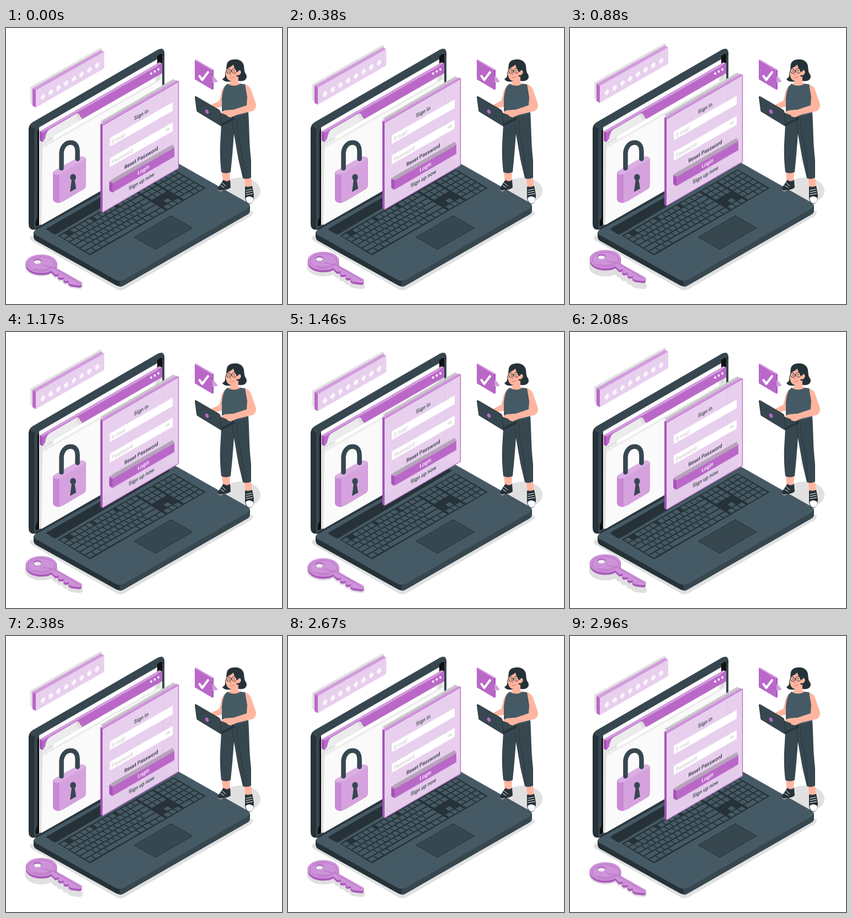
Write an HTML page that moves like this. It is 500x500 px and loops after 3 s.

```html
<!DOCTYPE html>
<html lang="en">
<head>
<meta charset="utf-8">
<title>Sign in</title>
<style>
  html, body { margin: 0; width: 100%; height: 100%; overflow: hidden; background: #fff; }
  svg { display: block; width: 100vw; height: 100vh; }
  text { font: 500 9.8px Roboto, Inter, sans-serif; }
  .panel { animation: lift 3s linear infinite; }
  .float { animation: hover 1.5s linear infinite; }
  @keyframes lift { 50% { transform: translateY(-20px); } }
  @keyframes hover { 50% { transform: translateY(-10px); } }
  .ink { fill: #263238; }
  .slate { fill: #37474f; }
  .steel { fill: #455a64; }
  .shade { fill: #e0e0e0; }
  .deep { fill: #a653b8; }
  .violet { fill: #ba68c8; }
  .lilac { fill: #d29bdc; }
  .pale { fill: #e8cfee; }
  .white { fill: #fff; }
  .skin { fill: #ffb5a0; }
  .line { fill: none; stroke-linecap: round; stroke-linejoin: round; }
</style>
</head>
<body>
<svg viewBox="0 0 500 500">
  <defs>
    <path id="keyShape" d="M36 427C36 418 48 411 64 411C80 411 92 418 92 427C92 430 91 432 89 434L137 461V465L134 467L118 465L113 462L114 458L107 459L104 456L105 452L97 453L94 450L96 446L89 447L82 440C77 443 71 444 64 444C48 444 36 437 36 427Z"/>
  </defs>

  <!-- ground shadows -->
  <path class="shade" d="M46 376Q40 381 47 386L198 472Q206 478 215 473L443 341Q450 336 445 331L206 440Z"/>
  <ellipse class="shade" cx="425" cy="295" rx="36" ry="24"/>
  <use href="#keyShape" y="4" fill="#e0e0e0" stroke="#e0e0e0" stroke-width="4" stroke-linejoin="round"/>

  <!-- laptop base -->
  <path class="ink" d="M50 370V379Q51 384 55 386L199 466Q206 470 214 466L437 338Q442 335 442 330V321Z"/>
  <path class="slate" d="M206 456V469Q210 469 214 466L437 338Q442 335 442 330V321Z"/>
  <path class="steel" d="M56 364Q46 370 54 375L198 456Q206 460 214 456L436 328Q446 322 437 316L292 234Q287 231 282 234Z"/>

  <!-- lid -->
  <path class="ink" d="M41 184Q41 175 48 171L275 39.500Q287 33 287 47V236L56 365Q41 368 41 355Z"/>
  <path class="slate" d="M51 190Q51 181 58 177L278 50Q287 45 287 55V232L51 365Z"/>
  <path class="slate" d="M48 171L275 39.500Q285 34.500 287 45L279 50L57 178L51 183Q44 178 44 175Z"/>
  <path fill="#111" d="M57 186L274 57L274 51L280 47Q283 46 283 50V229L56 359Q53 359 54 350L57 343Z"/>
  <path fill="#fafafa" d="M60 180L274 56.500V234L60 357Z"/>
  <path class="ink" d="M74 363L282 243L298 251L92 373Q88 375 84 372L76 367Q72 365 74 363Z"/>

  <!-- browser window -->
  <path class="shade" d="M61 204L66 207V355L61 357Z"/>
  <path fill="#fafafa" d="M66 207L283 82V231L64 357Z"/>
  <path class="lilac" d="M61 187L278 62L283 64L66 189Z"/>
  <path class="deep" d="M61 187L66 189V207L61 204Z"/>
  <path class="violet" d="M66 189L283 64V82L66 207Z"/>
  <path fill="#ececec" d="M66 207L71 200Q73 188 78 184L126 156Q132 153 134 160L138 165L283 82V93L66 218Z"/>
  <path class="shade" d="M126 156Q132 153 134 160L138 165L133 168Q129 166 128 162Z"/>
  <path class="shade" d="M61 204L66 207V218L61 215Z"/>
  <path class="white" d="M86 196L269 90.500V97L86 202.500Z"/>
  <g class="white">
    <ellipse cx="263" cy="82.500" rx="1.900" ry="2.300"/>
    <ellipse cx="269.500" cy="78.700" rx="1.900" ry="2.300"/>
    <ellipse cx="276" cy="75" rx="1.900" ry="2.300"/>
  </g>
  <path class="line" stroke="#bdbdbd" d="M272.500 89L279 85.200M272.500 92L279 88.200M272.500 95L279 91.200M69 208L72 206M75 204L78 202M80 201.500L83 200"/>

  <!-- padlock -->
  <path fill="#d5a2de" d="M85 264Q85 261 89 259L131 235Q135 232 140 233Q145 234 145 239V284Q145 289 141 292L104 314Q97 318 91 316Q85 314 85 309Z"/>
  <path fill="#c98ad5" d="M85 263Q90 268 97 265V317Q85 317 85 309Z"/>
  <path fill="#dcaee4" d="M85 262Q85 260 89 258L131 234Q136 231 141 234Q145 236 141 239L102 262Q95 266 88 264Z"/>
  <path class="line" stroke="#37474f" stroke-width="8.500" d="M100.500 254V228C100.500 216 108 207.500 117 207.500C125 207.500 129.500 213 129.500 224V237"/>
  <ellipse class="slate" cx="121.500" cy="270.500" rx="5.200" ry="6"/>
  <path class="slate" d="M119 274L124 272L127 291L116 297Z"/>

  <!-- keyboard and touchpad -->
  <path class="ink" d="M94 376L304 256L362 290L152 412Z"/>
  <g id="keys" class="steel" transform="matrix(9.240 -5.310 9.300 5.600 96 376.500)"/>
  <path class="slate" stroke="#263238" d="M232 379L299 340L338 362L271 401Z"/>

  <!-- sign-in panel -->
  <g class="panel">
    <path fill="#c8c8c8" d="M171 169L303 92.500L307 95L176 172Z"/>
    <path class="lilac" d="M171 173.500L308 94.500L313 96.500L175 176.500Z"/>
    <path class="deep" d="M171 173.500L175 176.500V334L171 332Z"/>
    <path class="pale" opacity=".985" d="M175 176.500L313 96.500V254L175 334Z"/>
    <path class="line" stroke="#ba68c8" stroke-width="1.300" d="M172 174L175 176.500L312.500 97V254L175 334"/>
    <path class="white" d="M188 199.500L302 134.500V150L188 215ZM188 236L302 171V187L188 252Z"/>
    <g class="line" stroke="#cfcfcf" stroke-width=".8">
      <path d="M290.500 186Q292 180.500 296.500 181.500Q295 187 290.500 186Z"/>
      <circle cx="293.500" cy="183.700" r="1.300"/>
    </g>
    <path fill="#b5a4b9" d="M187 278L193 273.500L302 211L305 216.500L193 281Z"/>
    <path class="deep" d="M187 278L193 281V298L189 296Q187 295 187 292Z"/>
    <path class="violet" d="M193 281L305 216.500V233L193 298Z"/>
    <g id="labels"/>
  </g>

  <!-- password bar -->
  <g class="float">
    <path class="shade" d="M44 107L171 36L174 38V68L50 139L44 136Z"/>
    <path class="lilac" d="M48 109.500L172 40L178 43.500L54 113.500Z"/>
    <path class="violet" d="M48 109.500L54 113V144L48 140.500Z"/>
    <path class="pale" d="M54 113L178 43V73L54 144Z"/>
    <g id="stars" class="line" stroke="#fff" stroke-width="1.900"/>
  </g>

  <!-- key -->
  <g class="float">
    <use href="#keyShape" y="3.500" class="deep"/>
    <use href="#keyShape" y="1.700" class="deep"/>
    <use href="#keyShape" fill="#cd93d8" stroke="#b868c6" stroke-width=".8"/>
    <ellipse class="line" cx="64" cy="427.500" rx="24" ry="13" stroke="#b868c6"/>
    <path class="line" stroke="#b868c6" d="M66 430L85 434L133 462M52 436Q68 442 82 433"/>
    <ellipse class="deep" cx="57" cy="422.700" rx="7.500" ry="4.500"/>
    <ellipse fill="#f2f2f2" cx="57" cy="423.800" rx="6.600" ry="3.300"/>
  </g>

  <!-- speech bubble -->
  <path class="lilac" d="M342 58L344 57L376 75.500L374 77Z"/>
  <path class="deep" d="M374 77L376 75.500V110.500L374 112Z"/>
  <path class="lilac" d="M376 87L384 97.500L373 99V88Z"/>
  <path class="violet" d="M342 58L374 77V112L342 93Z"/>
  <path class="line" stroke="#fff" stroke-width="4" d="M350.500 87L355.500 94L366 80"/>

  <!-- woman: legs and shoes -->
  <path class="skin" d="M391 259H406L405 279L393 280ZM431 268H444L445 289H434Z"/>
  <path class="ink" d="M394 275Q400 280 406 275L407 289Q402 293 396 293L386 296Q381 294 385 288Z"/>
  <path class="ink" d="M433 287Q440 289 446 286L449 302Q449 317 441 319Q434 318 433 308Z"/>
  <path class="white" d="M434 308Q440 302 448 308Q448 317 441 318Q435 317 434 308Z"/>
  <path class="line" stroke="#fff" stroke-width="1" d="M389 285L395 289M392 281L398 286M435 294L445 292M435 298L446 296M435 302L447 300M384 293Q386 297 392 294"/>
  <path class="slate" d="M391 157L439 152C441 180 440 205 444 240L444 271Q436 275 429 272L421 238L413 192L410 230L407 261Q398 265 390 261Q387 235 388 211Z"/>
  <path class="line" stroke="#263238" stroke-width=".9" d="M413 192L410 168M418 165Q418 190 424 209Q430 240 431 270M394 165Q399 170 409 164"/>

  <!-- woman: head, torso and arms -->
  <path class="ink" d="M400 72C398 62 405 57 413 57C422 56 430 61 431 69C432 75 431 79 435 84C438 90 434 96 427 96C421 97 417 94 415 91L408 97C401 98 394 97 392 92C396 91 398 87 397 81Z"/>
  <path class="skin" d="M397 105Q390 110 389 123L386 132L372 139L377 146L393 142L400 125Z"/>
  <path class="skin" d="M407 88H421V99L429 102Q417 111 400 102L407 99Z"/>
  <path class="skin" d="M399 74C402 69 408 68 412 66C415 72 419 75 422 76C426 76 427 81 424 84C422 86 420 86 418 85C417 93 412 97 407 96C401 95 398 88 398 80Z"/>
  <path class="ink" d="M399 75C399 66 404 62 412 62L418 64L422 77L419 80C416 76 413 72 412 66C409 70 404 71 399 75Z"/>
  <g class="line" stroke="#263238" stroke-width="1">
    <circle cx="403.500" cy="78" r="4"/>
    <circle cx="413.500" cy="77.500" r="4.400"/>
    <path d="M407.500 78L409 77.500M418 77L423 76"/>
    <path stroke="#d4705f" d="M408 80L406 84.500L408 85M405.500 89Q409 92 413 88"/>
  </g>
  <circle class="ink" cx="404" cy="78" r="1"/>
  <circle class="ink" cx="413" cy="77.500" r="1"/>
  <path class="steel" d="M401 101Q413 108 425 101L434 102Q438 113 438 126L439 154Q415 163 391 158L391 137Q390 120 396 106Z"/>
  <path class="skin" d="M433 102Q442 104 445 115L452 135Q455 145 448 150L419 157L408 160L392 156Q388 152 397 150L412 148L436 140L437 125Z"/>

  <!-- woman: small laptop -->
  <path class="ink" d="M389 178L414 166L413 161L388 155Z"/>
  <path class="slate" d="M388 153L411 163L391 173Z"/>
  <path class="skin" d="M412 148L397 149Q388 151 391 155L398 155L401 160L407 162Q413 160 420 156Z"/>
  <path class="ink" d="M342 125Q342 123 345 124L386 148Q388 149 388.500 152L391 176Q391 179 388 177L347 152Q345 151 345 148Z"/>
  <path class="slate" d="M343 126Q343 124 345 125L385 148.500Q387 149.500 387.500 152L390 175Q390 177 388 176L347.500 151Q346 150 345.500 148Z"/>
  <ellipse class="violet" cx="364" cy="151.500" rx="3" ry="4.200" transform="rotate(-25 364 151.500)"/>
</svg>

<script>
  const NS = 'http://www.w3.org/2000/svg';
  const add = (id, tag, attrs, content = '') => {
    const el = document.createElementNS(NS, tag);
    for (const name in attrs) el.setAttribute(name, attrs[name]);
    el.textContent = content;
    document.getElementById(id).append(el);
  };

  // Key widths per row; negative numbers are gaps.
  const run = (n, w = 1) => Array(n).fill(w);
  const gap = -0.25;
  const rows = [
    [1, -1, ...run(4), -0.5, ...run(4), -0.5, ...run(4), gap, ...run(3), gap, ...run(4)],
    [...run(13), 2, gap, ...run(3), gap, ...run(4)],
    [1.5, ...run(12), 1.5, gap, ...run(3), gap, ...run(4)],
    [1.75, ...run(11), 2.25, gap, -3, gap, ...run(4)],
    [2.25, ...run(10), 2.75, gap, -1, 1, -1, gap, ...run(4)],
    [...run(3, 1.25), 6.25, ...run(4, 1.25), gap, ...run(3), gap, 2, 1, 1]
  ];
  rows.forEach((row, y) => {
    let x = 0;
    for (const w of row) {
      if (w > 0) add('keys', 'rect', { x: x + 0.09, y: y + 0.1, width: w - 0.18, height: 0.78 });
      x += Math.abs(w);
    }
  });

  // Labels lie on the plane of the panel.
  const label = (content, x, y, fill, anchor = 'middle') => add('labels', 'text', {
    transform: `matrix(.866 -.5 0 1 ${x} ${y})`, fill, 'text-anchor': anchor
  }, content);
  label('Sign in', 245, 160, '#37474f');
  label('E-mail', 192, 210, '#cfcfcf', 'start');
  label('Password', 192, 246.5, '#cfcfcf', 'start');
  label('Reset Password', 245, 238.5, '#263238');
  label('Login', 249, 260, '#fff');
  label('Sign up now', 245.5, 281, '#37474f');

  for (let i = 0; i < 8; i++) {
    add('stars', 'path', {
      d: 'M0-4.600V4.600M-3.600-.400L3.600.400M-3.200 3.600L3.200-3.600',
      transform: `translate(${67 + i * 14} ${124.5 - i * 8.1})`
    });
  }
</script>
</body>
</html>
```
